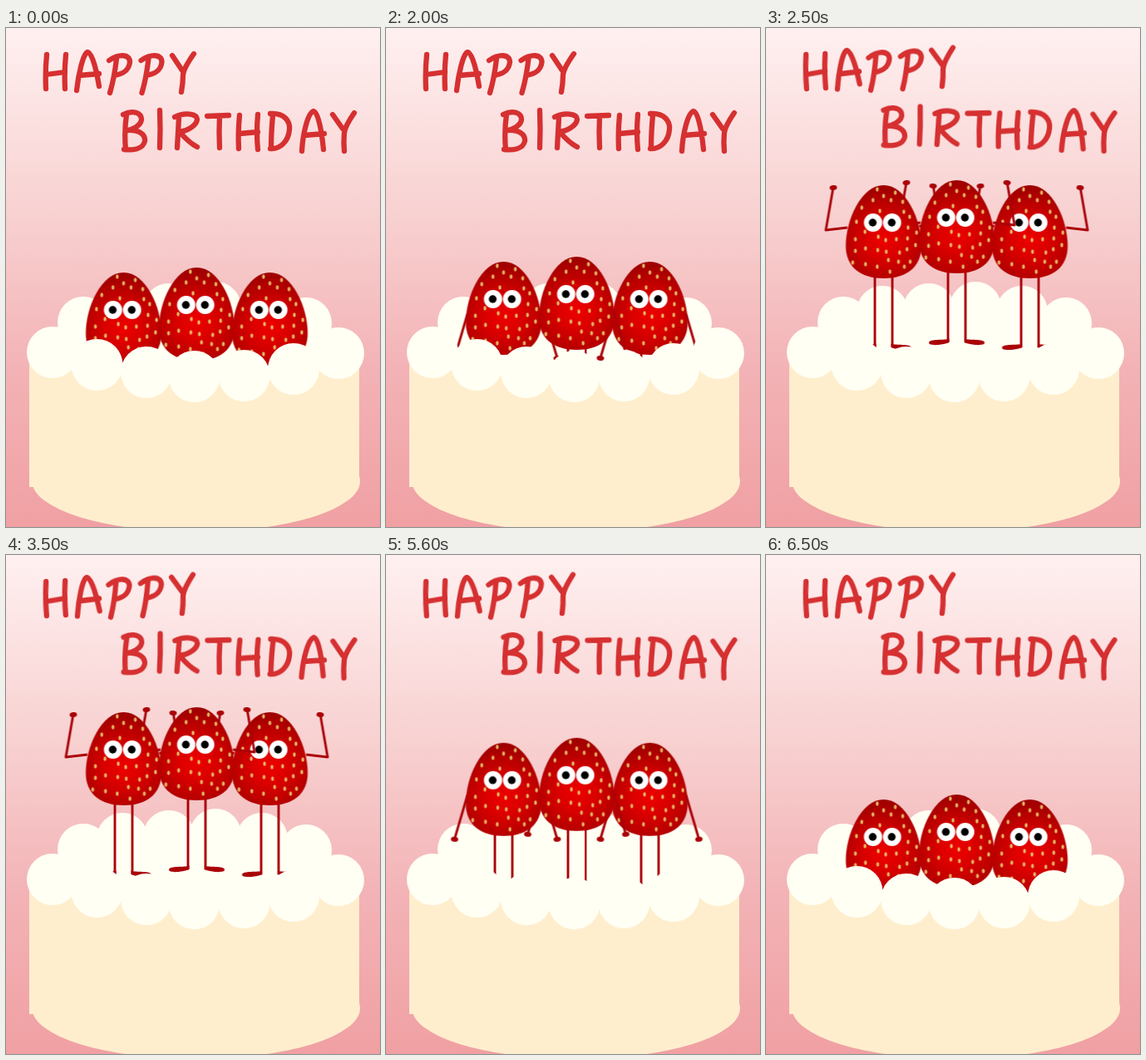
An HTML page without scripts for the animation above (7 s loop, 450 by 600 pixels).

```html
<!DOCTYPE html>
<html lang="en">
<head>
<meta charset="utf-8">
<title>Happy Birthday</title>
<style>
html, body { margin: 0; width: 100%; height: 100%; overflow: hidden; }
svg { display: block; width: 100%; height: 100%; }

.lettering { fill: none; stroke: #d63031; stroke-width: 6.3; stroke-linecap: round; stroke-linejoin: round; }
.line { animation: 1s step-end infinite; }
.top { transform-origin: 48px 52px; animation-name: tilt-top; }
.bottom { transform-origin: 415px 125px; animation-name: tilt-bottom; }
@keyframes tilt-top { 50%, 100% { transform: rotate(-2.4deg); } }
@keyframes tilt-bottom { 50%, 100% { transform: rotate(1.1deg); } }

.limb { fill: none; stroke: #aa0308; stroke-width: 2.9; stroke-linejoin: round; }
.skin { fill: #aa0308; }

/* hidden in the cream, climbs out, dances, sinks back */
.berries { animation: rise 7s infinite; }
@keyframes rise {
  0% { transform: translateY(105px); animation-timing-function: step-end; }
  28.571% { transform: translateY(92px); animation-timing-function: steps(5, end); }
  35.714% { transform: translateY(0); animation-timing-function: step-end; }
  78.571% { transform: translateY(18.4px); animation-timing-function: steps(5, end); }
  85.713% { transform: translateY(110.4px); animation-timing-function: step-end; }
  85.714%, 100% { transform: translateY(105px); animation-timing-function: step-end; }
}

/* arms hang while moving, then swap between two raised poses */
.down, .bent, .wide { animation: down 7s step-end infinite; }
.bent { animation-name: bent; }
.wide { animation-name: wide; }
@keyframes down {
  0%, 35.714%, 85.714%, 100% { opacity: 0; }
  28.571%, 78.571% { opacity: 1; }
}
@keyframes bent {
  0%, 42.857%, 57.142%, 71.428%, 100% { opacity: 0; }
  35.714%, 50%, 64.285% { opacity: 1; }
}
@keyframes wide {
  0%, 50%, 64.285%, 78.571%, 100% { opacity: 0; }
  42.857%, 57.142%, 71.428% { opacity: 1; }
}
</style>
</head>
<body>
<svg viewBox="0 0 450 600" role="img" aria-label="HAPPY BIRTHDAY">
  <defs>
    <linearGradient id="sky" x2="0" y2="1">
      <stop offset="0" stop-color="#fff0f0"/>
      <stop offset=".38" stop-color="#f8d0d0"/>
      <stop offset=".68" stop-color="#f3b3b6"/>
      <stop offset="1" stop-color="#f0a0a3"/>
    </linearGradient>
    <radialGradient id="red" gradientUnits="userSpaceOnUse" cx="0" cy="65" r="62">
      <stop offset="0" stop-color="#ee0000"/>
      <stop offset=".35" stop-color="#db0000"/>
      <stop offset="1" stop-color="#a00000"/>
    </radialGradient>
    <clipPath id="above-cake"><rect width="450" height="412"/></clipPath>

    <!-- one arm, from its shoulder -->
    <ellipse id="hand" class="skin" rx="4.5" ry="3"/>
    <g id="arm-down">
      <path class="limb" d="M0 12L-15 63"/>
      <use href="#hand" transform="translate(-15.5 65) rotate(10)"/>
    </g>
    <g id="arm-bent">
      <path class="limb" d="M0 0L-26 3L-17.5 -46"/>
      <use href="#hand" transform="translate(-17 -48) rotate(-10)"/>
    </g>
    <g id="arm-wide">
      <path class="limb" d="M0 0L-26 2L-35 -46"/>
      <use href="#hand" transform="translate(-35.5 -48) rotate(-25)"/>
    </g>

    <!-- both arms of an outer berry -->
    <g id="outer-down"><use href="#arm-down" x="-43.5" y="51"/><use href="#arm-down" x="44.5" y="45"/></g>
    <g id="outer-bent"><use href="#arm-bent" x="-43.5" y="51"/><use href="#arm-bent" x="44.5" y="45"/></g>
    <g id="outer-wide"><use href="#arm-wide" x="-43.5" y="51"/><use href="#arm-wide" x="44.5" y="45"/></g>

    <!-- one inward arm of the middle berry -->
    <use id="inner-down" href="#arm-down" x="44" y="57"/>
    <use id="inner-bent" href="#arm-bent" x="45.5" y="55"/>
    <use id="inner-wide" href="#arm-wide" x="45.5" y="55"/>

    <g id="leg">
      <path class="limb" d="M-10.5 100V194"/>
      <path class="skin" d="M-9 190.5C-14 193 -33 190 -33.5 195.5C-33 200 -16 198 -9 195Z"/>
    </g>
    <g id="legs">
      <use href="#leg"/>
      <use href="#leg" transform="scale(-1 1)"/>
    </g>

    <g id="eye">
      <circle r="11" fill="#fff"/>
      <circle cx="-.4" r="4.7"/>
    </g>
    <g id="berry">
      <path fill="url(#red)" d="M0 0C27 0 45.5 42 45.5 73C45.5 99 27 112 0 112S-45.5 99 -45.5 73C-45.5 42 -27 0 0 0Z"/>
      <!-- zero-length dashes with round caps, squeezed into seeds -->
      <path transform="scale(.64 1)" fill="none" stroke="#e6b766" stroke-width="5.4" stroke-linecap="round" d="
        M-12 5h0M22 9h0M0 13h0M-20 18h0M14 18h0M36 20h0M-41 27h0M-7 31h0M38 32h0M49 38h0
        M-51 44h0M46 51h0M62 57h0M-35 56h0M-53 65h0M-10 62h0M4 66h0M24 65h0M45 64h0
        M-34 76h0M-53 79h0M5 80h0M-11 78h0M44 77h0M60 72h0M30 81h0
        M-58 93h0M-34 95h0M9 90h0M28 92h0M50 92h0M-12 98h0M12 104h0M39 98h0"/>
      <use href="#eye" x="-12.7" y="45"/>
      <use href="#eye" x="10.2" y="45"/>
    </g>
    <circle id="puff" r="31"/>
  </defs>

  <rect width="450" height="600" fill="url(#sky)"/>

  <g class="lettering">
    <g class="line top">
      <path d="M49 32Q47 52 48 73M72 32Q70 52 71 73M48 56L71 53"/>
      <path d="M85 75C87 56 93 30 98 29C104 29 109 52 112 70M88 57L112 55"/>
      <path id="p" d="M133 37C131 54 128 68 125 78M124 39C136 31 149 31 149 41C148 52 138 56 130 57"/>
      <use href="#p" x="38.5"/>
      <path d="M200 33L212 51M226 31Q214 48 213 56Q213 66 211 77"/>
    </g>
    <g class="line bottom">
      <path d="M145 104Q142 125 144 146M141 104C153 98 163 102 163 110C162 118 152 122 146 123C160 122 168 128 167 136C165 146 152 147 142 146"/>
      <path d="M185 99Q186 122 185 144"/>
      <path d="M208 108Q207 126 206 144M203 107C215 101 230 103 230 110C229 118 217 124 209 125C215 132 222 139 230 143"/>
      <path d="M242 106L268 105M257 106Q256 126 257 144"/>
      <path d="M281 105Q279 126 280 145M303 104Q301 126 303 146M281 127L303 125"/>
      <path d="M321 105Q319 126 319 144M318 103C335 102 342 112 341 122C340 136 330 146 318 145"/>
      <path d="M356 148C357 128 363 102 370 100C376 101 380 126 382 146M359 129L383 127"/>
      <path d="M393 104L405 121M419 102Q408 118 407 126Q406 138 407 148"/>
    </g>
  </g>

  <g fill="#ffeecd">
    <path d="M28 390H425V540L28 552Z"/>
    <ellipse cx="228.7" cy="545" rx="197.3" ry="61"/>
  </g>

  <g fill="#fffff4">
    <path d="M56 390L93 353L140 341L196 338L252 336L308 341L361 355L401 391L346 410L286 418L227 419L169 414L109 405Z"/>
    <use href="#puff" x="93" y="354"/>
    <use href="#puff" x="140" y="341"/>
    <use href="#puff" x="196" y="338"/>
    <use href="#puff" x="252" y="336"/>
    <use href="#puff" x="308" y="341"/>
    <use href="#puff" x="361" y="355"/>
  </g>

  <g clip-path="url(#above-cake)">
    <g class="berries">
      <g transform="translate(141.5 189)">
        <use href="#legs"/>
        <use class="down" href="#outer-down"/>
        <use class="bent" href="#outer-bent"/>
        <use class="wide" href="#outer-wide"/>
        <use href="#berry"/>
      </g>
      <g transform="translate(229.5 183)">
        <use href="#legs"/>
        <use class="down" href="#inner-down"/>
        <use class="bent" href="#inner-bent"/>
        <use class="wide" href="#inner-wide"/>
        <g transform="translate(5 0) scale(-1 1)">
          <use class="down" href="#inner-down"/>
        </g>
        <g transform="scale(-1 1)">
          <use class="bent" href="#inner-bent"/>
          <use class="wide" href="#inner-wide"/>
        </g>
        <use href="#berry"/>
      </g>
      <g transform="translate(317.5 189)">
        <use href="#legs"/>
        <use href="#berry"/>
        <g transform="scale(-1 1)">
          <use class="down" href="#outer-down"/>
          <use class="bent" href="#outer-bent"/>
          <use class="wide" href="#outer-wide"/>
        </g>
      </g>
    </g>
  </g>

  <g fill="#fffff4">
    <use href="#puff" x="56" y="390"/>
    <use href="#puff" x="109.5" y="405"/>
    <use href="#puff" x="169" y="414"/>
    <use href="#puff" x="226.5" y="419"/>
    <use href="#puff" x="286.5" y="418"/>
    <use href="#puff" x="346" y="410"/>
    <use href="#puff" x="400" y="391"/>
  </g>
</svg>
</body>
</html>
```
